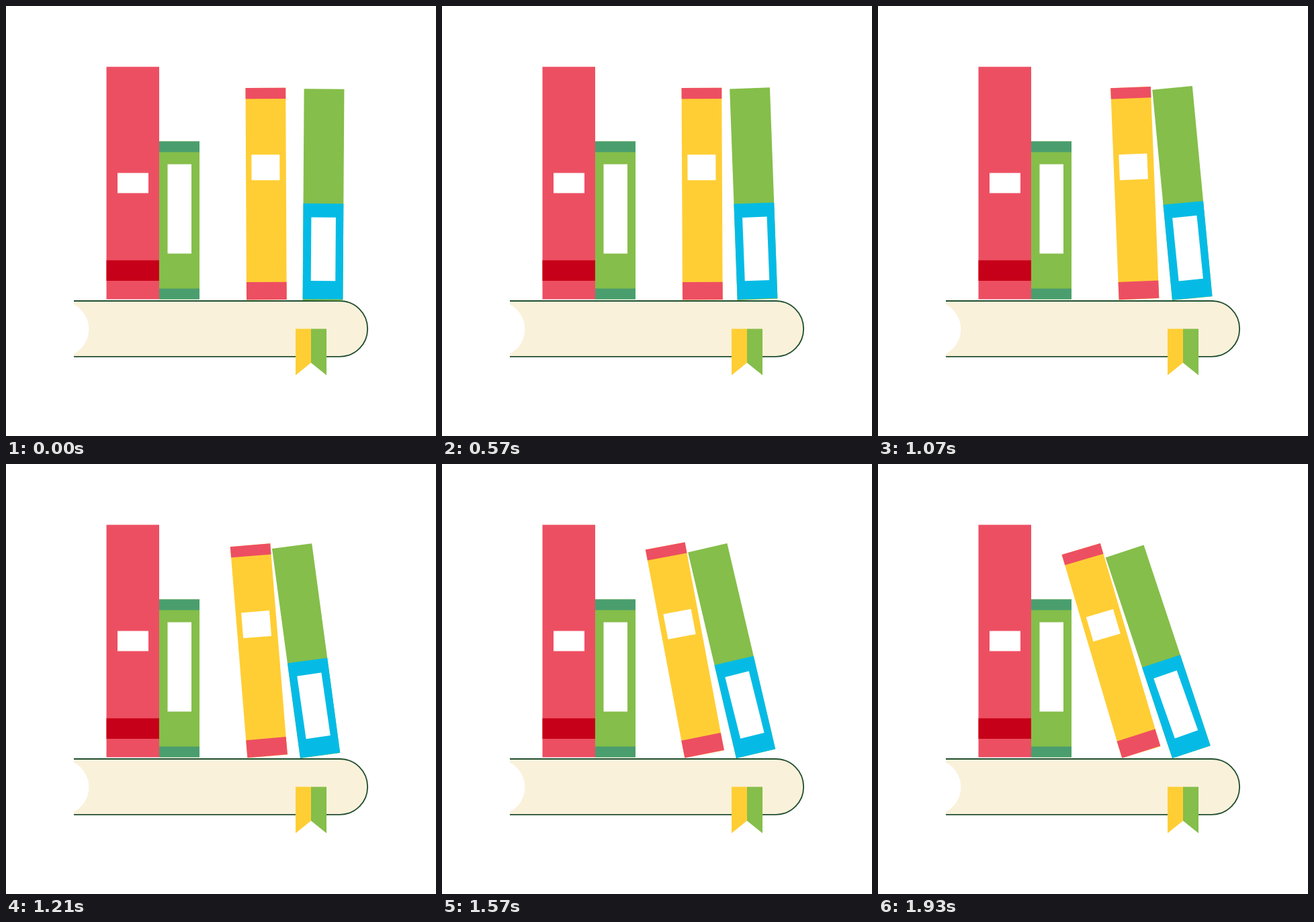
An HTML page that plays this animation: 640 px wide and 640 px high, repeating every 2.43 s.

```html
<!DOCTYPE html>
<html lang="en">
<head>
<meta charset="utf-8">
<title>Bookshelf</title>
<style>
  html, body { margin: 0; height: 100%; overflow: hidden; background: #fff; }
  svg { display: block; width: 100%; height: 100%; }
  .red { fill: #ed4f62; }
  .dark { fill: #c60018; }
  .green { fill: #85be4a; }
  .teal { fill: #4a9e6e; }
  .yellow { fill: #ffce35; }
  .blue { fill: #05bbe5; }
  .white { fill: #fff; }
</style>
</head>
<body>
<svg viewBox="0 0 640 640">
  <!-- shelf -->
  <path fill="#faf1da" d="M101 439H497a41.4 41.5 0 0 1 0 83H101V517.8A41.5 41.5 0 0 0 101 444.2Z"/>
  <path fill="none" stroke="#1f4d2e" stroke-width="1.8" d="M101 439H497a41.2 41.4 0 0 1 0 82.8H101"/>
  <path class="yellow" d="M431 480.5H454V531L431 549.5Z"/>
  <path class="green" d="M477 480.5H454V531L477 549.5Z"/>

  <!-- standing books -->
  <path class="red" d="M149.5 90.5H228V436.5H149.5Z"/>
  <path class="dark" d="M149.5 378.5H228V409H149.5Z"/>
  <path class="white" d="M166 248.5H212V278.5H166Z"/>
  <path class="green" d="M228 201.5H288V436.5H228Z"/>
  <path class="teal" d="M228 201.5H288V217.5H228ZM228 420.5H288V436.5H228Z"/>
  <path class="white" d="M240.5 235.5H276V368.5H240.5Z"/>

  <!-- leaning books, drawn from their lower left corner -->
  <g id="yellow">
    <rect class="yellow" y="-315.3" width="59.7" height="315.3"/>
    <rect class="red" y="-315.3" width="59.7" height="16.2"/>
    <rect class="white" x="8.3" y="-216" width="42" height="38"/>
    <rect class="red" id="band" y="-26.4" width="59.8" height="26.2"/>
  </g>
  <g id="green">
    <rect class="green" y="-314.7" width="59.8" height="314.7"/>
    <g id="panel">
      <rect class="blue" y="-142.4" width="59.8" height="142.4"/>
      <rect class="white" id="label" x="12" y="-121.7" width="36.5" height="94.5"/>
    </g>
  </g>
</svg>
<script>
const LOOP = 2430, STEPS = 27, HIT = 13.4;
const greenLean = [[0, .37], [4, -.95], [11, -2.95], [HIT, -3.65], [15, -5.42], [20, -11.07], [24, -15.32], [27, -18.38]];
const yellowLean = [[0, -.27], [HIT, -.25], [15, -2.25], [20, -8.26], [24, -13.06], [27, -16.48]];

const set = (id, transform) => document.getElementById(id).setAttribute('transform', transform);

// Linear interpolation between [step, value] keys
function at(keys, k) {
  const i = Math.max(1, keys.findIndex(key => key[0] >= k));
  const [k0, v0] = keys[i - 1], [k1, v1] = keys[i];
  return v0 + (v1 - v0) * (k - k0) / (k1 - k0);
}

// 14 steps a second, each start rounded to 10 ms
function stepAt(t) {
  let k = 0;
  while (k < STEPS && 10 * Math.round((k + 1) * 50 / 7) <= t) k++;
  return k;
}

function draw() {
  const k = stepAt(performance.now() % LOOP);
  const g = at(greenLean, k), y = at(yellowLean, k);
  set('green', `translate(${Math.max(438, 441.6 - .24 * k)} 438) rotate(${g})`);
  set('panel', `translate(0 ${Math.min(0, .09 * k - 1.8)})`);
  set('label', `rotate(${.06 * g} 30.3 -74.5)`);
  set('yellow', `translate(${358 + .37 * Math.max(0, k - HIT)} 437.4) rotate(${y})`);
  set('band', `rotate(${.07 * y} 29.9 -13.3)`);
  requestAnimationFrame(draw);
}
draw();
</script>
</body>
</html>
```
